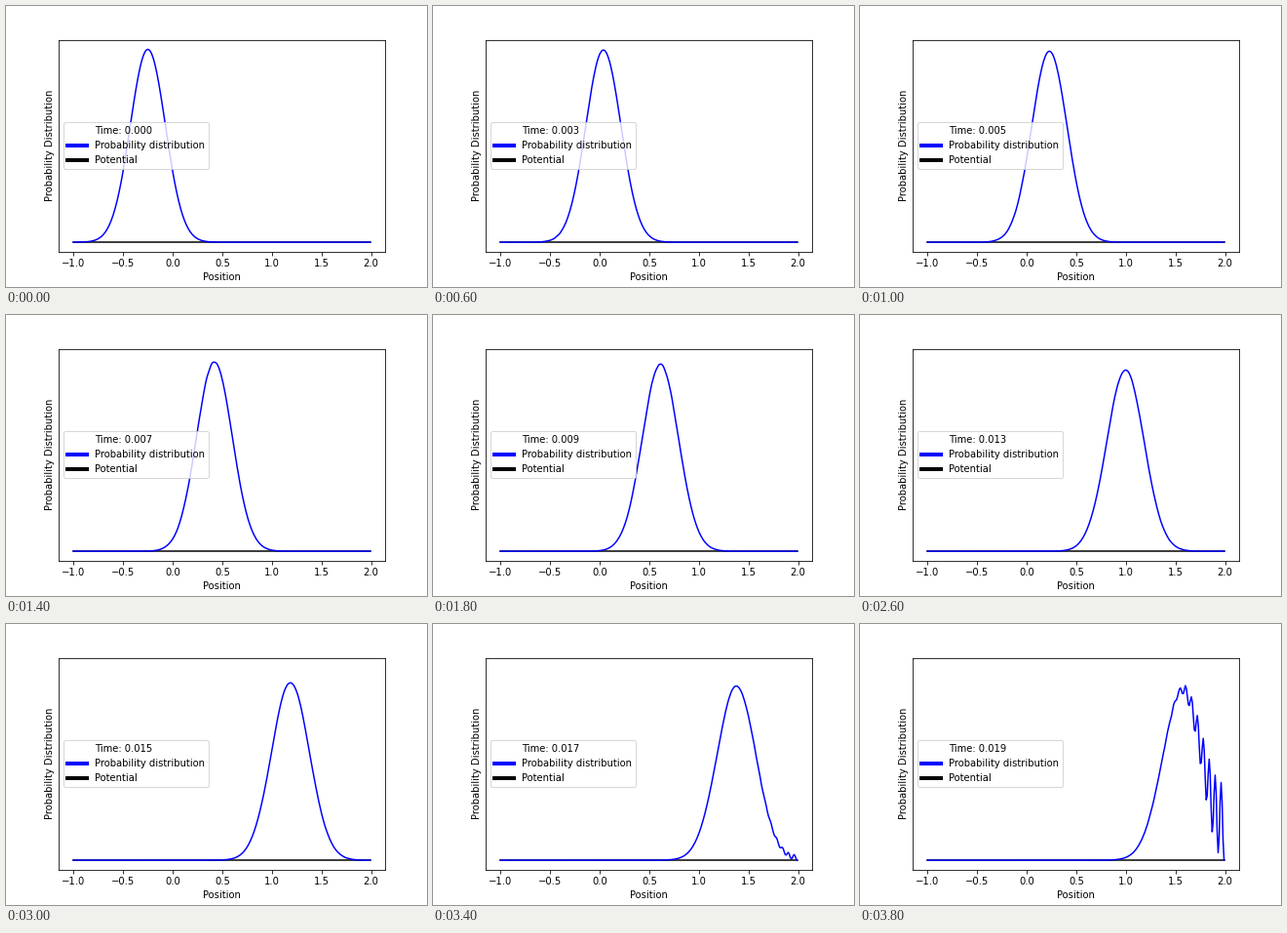
A matplotlib script that plays this animation: 432 px wide and 288 px high, repeating every 4 s.

```python
import numpy as np
import matplotlib.pyplot as plt
from matplotlib.animation import FuncAnimation
from matplotlib.lines import Line2D

FRAMES, INTERVAL = 20, 200
DT = 0.001

# Free wave packet between two hard walls, on a grid
DX, N = 0.01, 300
X0, WIDTH, K0 = -0.25, 0.25, 50
x = -1 + DX * np.arange(N)
psi0 = np.exp(-(x - X0) ** 2 / (2 * WIDTH ** 2) + 1j * K0 * x)

# Sine modes of the discrete Laplacian
n = np.arange(1, N - 1)
modes = np.sin(np.pi * np.outer(n, n) / (N - 1))
energy = (2 - 2 * np.cos(np.pi * n / (N - 1))) / DX ** 2
coeffs = 2 / (N - 1) * modes @ psi0[1:-1]


def density(t):
    p = np.zeros(N)
    p[1:-1] = np.abs(modes @ (coeffs * np.exp(-1j * energy * t))) ** 2
    return p


plt.rcParams.update({"font.family": "DejaVu Sans", "font.size": 10})
fig, ax = plt.subplots(figsize=(6, 4), dpi=72)
fig.subplots_adjust(left=0.125, right=0.9, bottom=0.125, top=0.88)

ax.plot(x, np.zeros(N), color="black")
curve, = ax.plot(x, density(0), color="blue")
ax.set_yticks([])
ax.set_xlabel("Position")
ax.set_ylabel("Probability Distribution")

handles = [Line2D([0], [0], color=c, lw=4) for c in ("white", "blue", "black")]
legend = ax.legend(
    handles,
    ["Time: 0.000", "Probability distribution", "Potential"],
    loc="center left",
)
clock = legend.get_texts()[0]


def update(i):
    t = i * DT
    curve.set_ydata(density(t))
    clock.set_text(f"Time: {t:.3f}")
    return curve, legend


anim = FuncAnimation(fig, update, frames=FRAMES, interval=INTERVAL,
                     repeat=True, repeat_delay=0)
plt.show()
```
